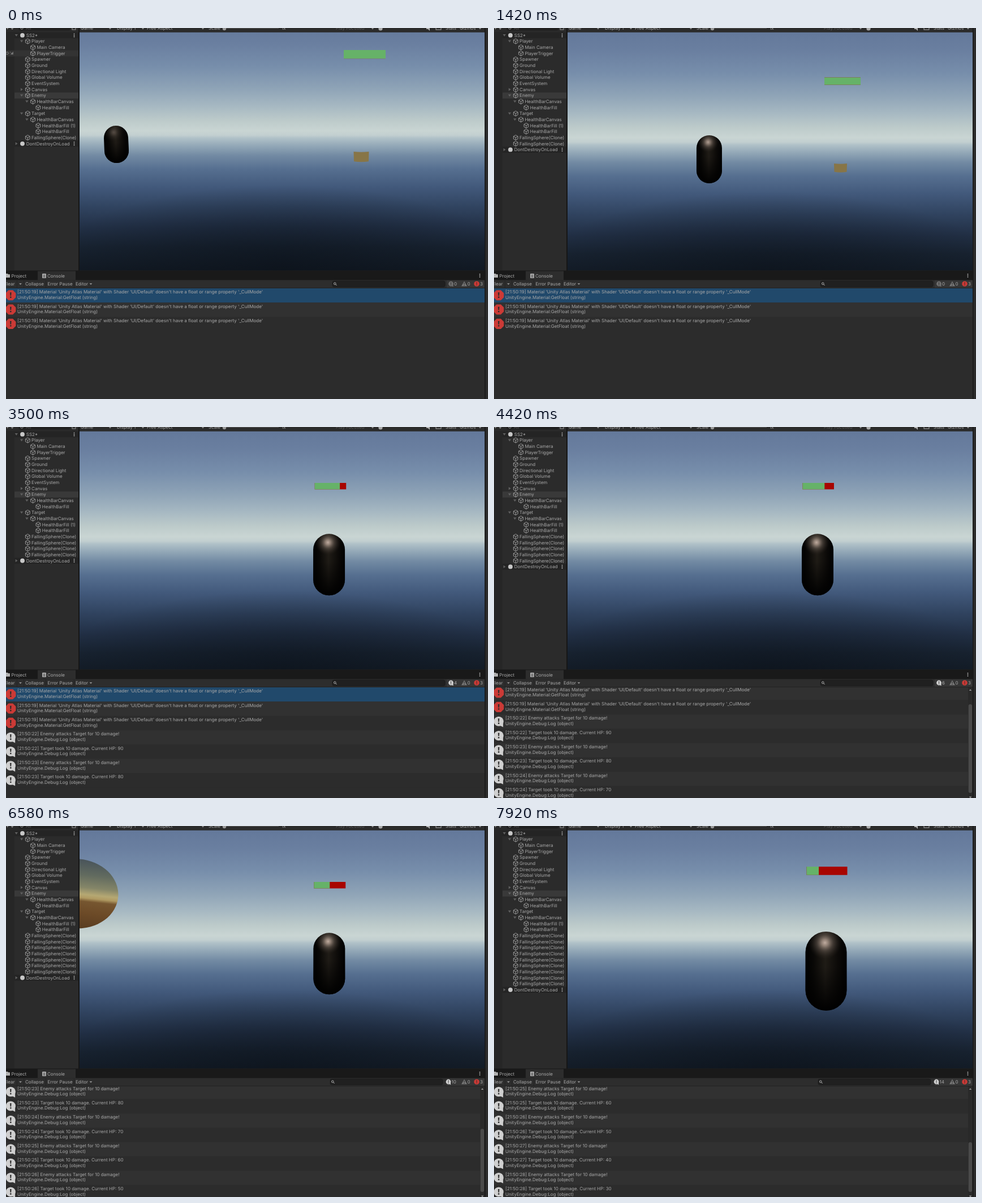
An HTML page for the animation above (8000 ms loop, 852 by 657 pixels).

```html
<!DOCTYPE html>
<html lang="en">
<head>
<meta charset="utf-8">
<title>Editor play mode</title>
<style>
html, body { margin: 0; width: 852px; height: 657px; overflow: hidden; background: #2b2b2b; }
svg { display: block; }
text { font: 8px Inter, sans-serif; fill: #a9a9a9; text-rendering: geometricPrecision; white-space: pre; }
.dim { fill: #5a5a5a; }
</style>
</head>
<body>
<svg id="stage" width="852" height="657" viewBox="0 0 852 657"></svg>
<script>
const LOOP = 8000, TICK = 1000 / 12;
const ROW = 10.66, LOG = 25.35, LOG_TOP = 461;

// ---- markup helpers ----
const rect = (x, y, w, h, fill, extra = '') =>
  `<rect x="${x}" y="${y}" width="${w}" height="${h}" fill="${fill}" ${extra}/>`;
const text = (x, y, s, extra = '') => `<text x="${x}" y="${y}" ${extra}>${s}</text>`;
const path = (d, extra) => `<path d="${d}" ${extra}/>`;
const group = (id, body, extra = '') => `<g id="${id}" ${extra}>${body}</g>`;
const stops = list => list.map(([o, c, a = 1]) =>
  `<stop offset="${o}" stop-color="${c}" stop-opacity="${a}"/>`).join('');
const down = (x, y) => path(`M${x - 2.4} ${y - 1.3}h4.8l-2.4 3z`, 'fill="#8c8c8c"');
const dots = (x, y) => [-2.6, 0, 2.6].map(d =>
  `<circle cx="${x}" cy="${y + d}" r=".9" fill="#b5b5b5"/>`).join('');
const polygon = (cx, cy, r, n, turn) => 'M' + Array.from({ length: n }, (_, i) => {
  const a = turn + i * 2 * Math.PI / n;
  return (cx + r * Math.cos(a)).toFixed(2) + ' ' + (cy + r * Math.sin(a)).toFixed(2);
}).join('L') + 'z';
const bang = (x, y, s, fill) => path(
  `M${x - 1.3 * s} ${y - 5 * s}h${2.6 * s}l${-0.5 * s} ${6 * s}h${-1.6 * s}z` +
  `M${x - 1.2 * s} ${y + 2.4 * s}h${2.4 * s}v${2.4 * s}h${-2.4 * s}z`, `fill="${fill}"`);
const errorIcon = (x, y, s) =>
  path(polygon(x, y, 10 * s, 8, Math.PI / 8), 'fill="#cb3a36"') + bang(x, y, s, '#2b2b2b');
const infoIcon = (x, y, s, fill = '#cfcfcf') =>
  `<circle cx="${x}" cy="${y}" r="${8.8 * s}" fill="${fill}"/>` +
  path(`M${x + s} ${y + 7 * s}l${7 * s} ${3.4 * s}v${-7 * s}z`, `fill="${fill}"`) +
  bang(x, y, s, '#2b2b2b');
const objectIcon = (x, y) => path(
  polygon(x, y, 4.5, 6, Math.PI / 6) + `M${x - 3.9} ${y - 2.2}L${x} ${y}L${x + 3.9} ${y - 2.2}M${x} ${y}v4.5`,
  'fill="none" stroke="#a3a3a3" stroke-width=".9"');

// ---- hierarchy ----
const rowY = i => 12.9 + ROW * i;
function treeRow(i, depth, name, arrow) {
  const y = rowY(i), x = 29 + 9.3 * depth, scene = depth === 0;
  let s = scene ? rect(15, y - 5.3, 113, ROW, '#242424') : '';
  if (arrow) s += path(arrow === 'v' ? `M${x - 13.4} ${y - 2}h5.4l-2.7 4z` : `M${x - 12.4} ${y - 2.7}v5.4l4-2.7z`,
    'fill="#5f5f5f"');
  s += scene ? `<circle cx="${x}" cy="${y}" r="3.9" fill="#c8c8c8"/>` + dots(120.5, y) : objectIcon(x, y);
  return s + text(x + 6.8, y + 2.9, name, name === 'SS2*' ? 'font-weight="700"' : '');
}
const tree = [
  [0, 'SS2*', 'v'], [1, 'Player', 'v'], [2, 'Main Camera'], [2, 'PlayerTrigger'], [1, 'Spawner'],
  [1, 'Ground'], [1, 'Directional Light'], [1, 'Global Volume'], [1, 'EventSystem'],
  [1, 'Canvas', '>'], [1, 'Enemy', 'v'], [2, 'HealthBarCanvas', 'v'], [3, 'HealthBarFill'],
  [1, 'Target', 'v'], [2, 'HealthBarCanvas', 'v'], [3, 'HealthBarFill (1)'], [3, 'HealthBarFill']
];
const BASE = tree.length;

function hierarchy() {
  let s = rect(0, 0, 128, 430, '#2b2b2b') + rect(0, 7, 15, 423, '#262626') + rect(0, 0, 128, 7, '#2a2a2a');
  s += text(0, 3, '+') + down(11, 1.5) + rect(22, -6, 92, 10.5, '#202020', 'rx="3"') +
    `<circle cx="28" cy="0" r="2.2" fill="none" stroke="#999"/>` + text(35, 3, 'All', 'class="dim"') +
    rect(117, -3, 6, 6, 'none', 'stroke="#999"');
  s += rect(15, rowY(10) - 5.3, 113, ROW, '#393939');
  s += group('hover', rect(0, rowY(3) - 5.3, 128, ROW, '#333') +
    path(`M-1 44.6q3-4 6 0q-3 4-6 0`, 'fill="none" stroke="#888"') +
    path(`M7 42l5 5M8.5 46.500h4v-4z`, 'fill="#777" stroke="#777" stroke-width=".8"'));
  s += tree.map((r, i) => treeRow(i, ...r)).join('');
  for (let i = 0; i < 9; i++) s += group('ball' + i, treeRow(BASE + i, 1, 'FallingSphere(Clone)'));
  return s + group('keep', treeRow(BASE, 0, 'DontDestroyOnLoad', '>'));
}

// ---- game view ----
const sky = [[0, '#627799'], [40, '#6a7fa0'], [80, '#778eab'], [120, '#8fa4b7'], [150, '#a6b8c2'],
  [175, '#bccaca'], [194, '#c9d5d3'], [202, '#c2cfd0'], [207, '#b0c1c8'], [220, '#94a9b8'],
  [238, '#728aa3'], [262, '#566f90'], [295, '#41587a'], [330, '#30435f'], [365, '#223046'],
  [400, '#182331'], [440, '#121a24']];

const defs = `<defs>
<linearGradient id="sky" gradientUnits="userSpaceOnUse" x1="0" y1="0" x2="0" y2="440">${stops(sky.map(([y, c]) => [y / 440, c]))}</linearGradient>
<radialGradient id="deep">${stops([[0, '#0a1018', .6], [.5, '#0a1018', .32], [1, '#0a1018', 0]])}</radialGradient>
<linearGradient id="body">${stops([[0, '#000'], [.2, '#0a0907'], [.48, '#221e18'], [.78, '#0d0b09'], [1, '#000']])}</linearGradient>
<linearGradient id="foot" x2="0" y2="1">${stops([[0, '#000', 0], [.45, '#000', .1], [.85, '#000', .75], [1, '#000']])}</linearGradient>
<radialGradient id="shine" gradientUnits="userSpaceOnUse">${stops([[0, '#c0aca0'], [.2, '#9c8a7e', .9], [.5, '#5d524a', .6], [1, '#2a241f', 0]])}</radialGradient>
<linearGradient id="globe" x1=".04" x2="0" y2="1">${stops([[0, '#4b565b'], [.2, '#626b5f'], [.38, '#858668'], [.48, '#b5a873'], [.53, '#b09a62'], [.58, '#765630'], [.75, '#6c4a27'], [1, '#573b20']])}</linearGradient>
<clipPath id="view"><rect x="130" y="7.500" width="716" height="422"/></clipPath>
<clipPath id="list"><rect x="0" y="${LOG_TOP}" width="846" height="196"/></clipPath>
</defs>`;

function gameView() {
  const backdrop = rect(130, -20, 716, 480, 'url(#sky)') +
    `<ellipse cx="488" cy="440" rx="420" ry="150" fill="url(#deep)"/>`;
  const capsule = ['url(#body)', 'url(#foot)', 'url(#shine)'].map(f => rect(0, 0, 1, 1, f, 'class="cap"')).join('');
  return group('game', group('backdrop', backdrop) +
    path('', 'id="crate" fill="#877547"') +
    group('capsule', capsule) +
    rect(0, 0, 1, 1, '#a80500', 'id="lost"') + rect(0, 0, 1, 1, '#66b268', 'id="life"') +
    `<ellipse id="globeBall" rx="73.500" ry="61.500" fill="url(#globe)"/>`, 'clip-path="url(#view)"');
}

function gameBar() {
  let s = rect(130, 0, 716, 7.5, '#2b2b2b');
  [[132, 'Game'], [196, 'Display 1'], [249, 'Free Aspect'], [358, 'Scale'], [487, '1x'], [777, 'Stats'], [802, 'Gizmos']]
    .forEach(([x, t]) => s += text(x, 3, t));
  s += text(583, 3, 'Play Focused', 'class="dim"');
  [184, 242, 348, 648, 838].forEach(x => s += down(x, 1));
  s += rect(386, 0, 96, 1, '#555') + '<circle cx="386" cy="1" r="3.200" fill="#999"/>';
  s += '<circle cx="662" cy="1" r="3.600" fill="#aaa"/>' + path('M743-1h3l3-3v9l-3-3h-3z', 'fill="#b5b5b5"') +
    rect(760, -3, 9, 6, 'none', 'stroke="#aaa"');
  return s;
}

// ---- console ----
const logs = Array(3).fill(["[21:50:19] Material 'Unity Atlas Material' with Shader 'UI/Default' doesn't have a float or range property '_CullMode'",
  'UnityEngine.Material:GetFloat (string)']);
for (let k = 0; k < 7; k++) {
  const stamp = `[21:50:${22 + k}] `, from = 'UnityEngine.Debug:Log (object)';
  logs.push([stamp + 'Enemy attacks Target for 10 damage!', from],
    [stamp + `Target took 10 damage. Current HP: ${90 - 10 * k}`, from]);
}

function consolePanel() {
  let s = rect(0, 429.5, 852, 17, '#191919') + rect(56, 430.5, 67, 16, '#2d2d2d') +
    rect(0, 446.5, 846, 14.5, '#2d2d2d') + rect(0, 460.3, 846, .8, '#1e1e1e') + rect(0, LOG_TOP, 846, 196, '#2c2c2c');
  s += path('M0 435h3l1 1.300h3v5.700h-7z', 'fill="#b0b0b0"') + text(9.5, 441.8, 'Project');
  s += rect(64, 435, 7, 8, '#b0b0b0', 'rx="1"') +
    path('M65.500 437.500h4M65.500 439.500h4M65.500 441.300h4', 'stroke="#333" stroke-width=".8"') + text(73, 441.8, 'Console');
  s += dots(837.5, 438.5);
  s += text(-4.5, 456, 'Clear') + down(25.5, 453.3) + text(34, 456, 'Collapse') + text(73.5, 456, 'Error Pause') +
    text(123, 456, 'Editor') + down(150, 453.3);
  s += rect(19, 447, .8, 13, '#222') + rect(31, 447, .8, 13, '#222') + rect(70, 447, .8, 13, '#222') + rect(120, 447, .8, 13, '#222');
  s += group('search', rect(577, 448, 199, 10.500, '#202020', 'rx="3" stroke="#191919" stroke-width=".7"') +
    '<circle cx="581.300" cy="452.600" r="1.800" fill="none" stroke="#b5b5b5"/>' + path('M582.700 454l2 2', 'stroke="#b5b5b5"'));
  s += rect(779, 447, 67, 13, '#363636');
  s += group('idle', infoIcon(786.5, 453, .5, '#6e6e6e')) + group('active', infoIcon(786.5, 453, .5));
  s += text(792, 456, '0', 'id="count"');
  s += path('M810 448.500l5 8.800h-10z', 'fill="#777"') + bang(810, 453.8, .5, '#2b2b2b') + text(815.5, 456, '0');
  s += errorIcon(832, 453, .5) + text(838, 456, '3');

  const rows = logs.map(([a, b], i) => {
    const y = LOG_TOP + LOG * i;
    const fill = i === 0 ? '#21496b' : i % 2 ? '#313131' : '#2c2c2c';
    return group('log' + i, rect(0, y, 846, LOG, fill) + (i < 3 ? errorIcon : infoIcon)(8.3, y + 12.2, .98) +
      text(20, y + 9.2, a) + text(20, y + 18.8, b));
  }).join('');
  s += group('clipped', group('logs', rows), 'clip-path="url(#list)"');
  s += group('scroll', rect(838, LOG_TOP, 8, 196, '#292929') + rect(838.7, 491, 6.3, 100, '#4a4a4a', 'id="thumb" rx="3"') +
    path('M839.800 467h4.400l-2.200-2.800z', 'fill="#999"') + path('M839.800 654.500h4.400l-2.200 2.800z', 'fill="#999"'));
  return s;
}

const stage = document.getElementById('stage');
stage.innerHTML = defs + rect(0, 0, 852, 657, '#2b2b2b') + rect(128, 0, 2, 430, '#161616') + gameView() + gameBar() +
  hierarchy() + consolePanel() + rect(846, 0, 1.6, 657, '#161616') + rect(847.6, 0, 4.4, 657, '#2b2b2b');

// ---- motion ----
const el = id => document.getElementById(id);
const set = (node, attrs) => { for (const k in attrs) node.setAttribute(k, attrs[k]); };
const show = (id, on) => set(el(id), { display: on ? 'inline' : 'none' });
const shift = (id, x, y) => set(el(id), { transform: `translate(${x} ${y})` });

// time, horizon, bar x y w, capsule x y w h, shine, crate x y w, tilt
const keys = [
  [83, -12, 634, 39, 74, 195, 173, 43, 66, .35, 628, 219, 27, -2.5],
  [1000, 0, 622, 87, 65, 312, 190, 43.5, 80, .85, 617, 240.3, 23.5, -.5],
  [1417, 0, 616, 87.5, 64, 380.5, 190, 45, 85, .9, 612.5, 240, 23, 0],
  [2083, 0, 599, 91.5, 60, 499, 188, 51, 102.5, 1, 596.5, 238, 21.5, 0],
  [2667, 0, 592, 92.5, 59, 524, 188, 52.5, 105, 1, 590, 238, 21, 0],
  [3420, 0, 573.5, 99, 55.5, 571, 189.3, 56, 109, 1, 573, 237, 20, 0],
  [4417, 0, 573.2, 99, 55.5, 572, 189.3, 56, 109, 1, 573, 237, 20, 0],
  [6750, 0, 572.2, 99, 56, 571.3, 189.3, 56, 109, 1, 573, 237, 20, 0],
  [7650, 0, 588.5, 72, 72, 587, 187, 73, 140, 1, 588, 240, 25, 0]
];
function pose(t) {
  if (t <= keys[0][0]) return keys[0];
  const i = keys.findIndex(k => k[0] > t);
  if (i < 0) return keys[keys.length - 1];
  const a = keys[i - 1], b = keys[i], f = (t - a[0]) / (b[0] - a[0]);
  return a.map((v, j) => v + (b[j] - v) * f);
}
const ticks = (t, start) => t < start ? 0 : Math.floor((t - start) / 1020) + 1;

function drawGame(t, hits) {
  const [, horizon, bx, by, bw, cx, cy, cw, ch, shine, kx, ky, kw, tilt] = pose(t);
  shift('backdrop', 0, horizon);

  const left = bx - bw / 2, bar = { x: left, y: by, height: bw * .205 };
  set(el('lost'), { ...bar, width: bw });
  set(el('life'), { ...bar, width: bw * (1 - hits / 10) });

  const kh = kw * .68, h = kw / 2;
  set(el('crate'), { d: `M${kx - h} ${ky}Q${kx} ${ky + 1.5} ${kx + h} ${ky}L${kx + h - .5} ${ky + kh - 1}Q${kx} ${ky + kh + 1} ${kx - h + .5} ${ky + kh - 1}z` });

  const caps = stage.querySelectorAll('.cap');
  caps.forEach(c => set(c, { x: cx - cw / 2, y: cy, width: cw, height: ch, rx: cw / 2, ry: cw / 2 }));
  set(caps[2], { opacity: shine });
  set(el('shine'), { cx: cx - 2 + tilt * .8, cy: cy + cw * .27, r: cw * .4 });
  set(el('capsule'), { transform: `rotate(${tilt} ${cx} ${cy + ch / 2})` });

  // free fall, passing y 119.5 at 6583 ms
  const s = (t - 6583) / 1000;
  show('globeBall', s > -.3 && s < .4);
  set(el('globeBall'), { transform: `translate(125 ${119.5 + 1050 * s + 600 * s * s}) rotate(4)` });
}

function drawTree(t) {
  const balls = 1 + ticks(t, 600);
  for (let i = 0; i < 9; i++) show('ball' + i, i < balls);
  shift('keep', 0, balls * ROW);
  show('hover', t < 160);
}

function drawConsole(hits) {
  const n = 3 + 2 * hits, full = n > 7, wide = hits > 4;
  logs.forEach((_, i) => show('log' + i, i < n));
  shift('logs', 0, full ? -(28 + (n - 9) * LOG) : 0);
  show('scroll', full);
  const size = 33400 / (n * LOG) + 10.5;
  if (full) set(el('thumb'), { y: 648 - size, height: size });
  shift('search', wide ? -4 : 0, 0);
  shift('active', wide ? -4.5 : 0, 0);
  show('idle', !hits);
  show('active', hits);
  el('count').textContent = 2 * hits;
  set(el('count'), { x: wide ? 787.5 : 792 });
}

function draw(now) {
  const t = Math.floor((now % LOOP + 4) / TICK) * TICK;
  const hits = ticks(t, 1745);
  drawGame(t, hits);
  drawTree(t);
  drawConsole(hits);
}
const begin = performance.now();
function loop() {
  draw(performance.now() - begin);
  requestAnimationFrame(loop);
}
loop();
</script>
</body>
</html>
```
